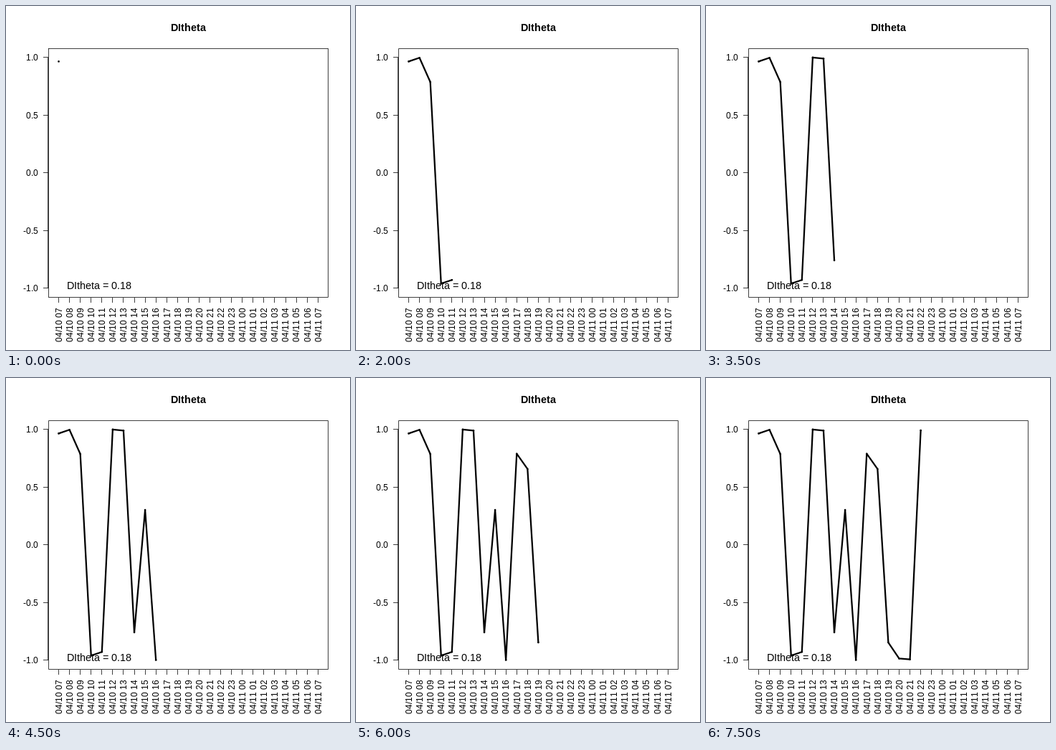
These frames come from a looping animation (480x480 px, 8000 ms). An HTML page with a canvas:

```html
<!DOCTYPE html>
<html lang="en">
<head>
<meta charset="utf-8">
<title>DItheta</title>
<style>
  html, body { margin: 0; width: 100%; height: 100%; overflow: hidden; background: #fff; }
  canvas { display: block; width: 480px; height: 480px; }
</style>
</head>
<body>
<canvas id="plot" width="480" height="480"></canvas>
<script>
const ctx = document.getElementById('plot').getContext('2d');
const FONT = '"Liberation Sans", Arial, sans-serif';
const STEP = 500, LOOP = 8000;
const HOURS = 25, FIRST_HOUR = 7, FIRST_DAY = 10;
const LEFT = 59.5, TOP = 59.5, RIGHT = 449.5, BOTTOM = 406.5;
const TICK = 7, LABEL_GAP = 14.5, HALF_DIGIT = 4.3;
const values = [0.966, 0.998, 0.788, -0.961, -0.929, 1, 0.991, -0.759,
                0.303, -0.999, 0.79, 0.658, -0.847, -0.986, -0.994, 0.993];

const xAt = i => 73.51 + i * 15.074;
const yAt = v => 232.8 - v * 160.89;
const pad = n => String(n).padStart(2, '0');
const snap = n => Math.floor(n) + 0.5;

function line(x1, y1, x2, y2) {
  ctx.beginPath();
  ctx.moveTo(x1, y1);
  ctx.lineTo(x2, y2);
  ctx.stroke();
}

// Sets glyphs on whole pixels; align is 0 for left, 0.5 for centre, 1 for right.
function text(str, x, y, size, align, weight = 'normal') {
  ctx.font = `${weight} ${size}px ${FONT}`;
  const widths = [...str].map(c => Math.round(ctx.measureText(c).width));
  const total = widths.reduce((a, b) => a + b, 0);
  let pen = Math.round(x - total * align);
  [...str].forEach((c, i) => {
    ctx.fillText(c, pen, Math.round(y));
    pen += widths[i];
  });
}

function drawAxes() {
  ctx.lineWidth = 0.75;
  ctx.lineCap = 'butt';
  ctx.strokeRect(LEFT, TOP, RIGHT - LEFT, BOTTOM - TOP);

  line(LEFT - 1, yAt(1), LEFT - 1, yAt(-1));
  for (let v = -1; v <= 1; v += 0.5) {
    const y = snap(yAt(v));
    line(LEFT - 0.5, y, LEFT - 0.5 - TICK, y);
    text(v.toFixed(1), LEFT - LABEL_GAP, yAt(v) + HALF_DIGIT, 12, 1);
  }

  for (let i = 0; i < HOURS; i++) {
    const hour = FIRST_HOUR + i;
    const day = FIRST_DAY + Math.floor(hour / 24);
    const x = snap(xAt(i));
    line(x, BOTTOM + 0.5, x, BOTTOM + 0.5 + TICK);
    ctx.save();
    ctx.translate(Math.round(xAt(i) + HALF_DIGIT), BOTTOM + LABEL_GAP);
    ctx.rotate(-Math.PI / 2);
    text(`04/${day} ${pad(hour % 24)}`, 0, 0, 12, 1);
    ctx.restore();
  }
}

function drawSeries(count) {
  ctx.lineWidth = 2.25;
  ctx.lineCap = ctx.lineJoin = 'round';
  ctx.beginPath();
  for (let i = 0; i < count; i++) ctx.lineTo(xAt(i), yAt(values[i]));
  if (count > 1) ctx.stroke();
  for (let i = 0; i < count; i++) {
    ctx.beginPath();
    ctx.arc(xAt(i), yAt(values[i]), 1.3, 0, 2 * Math.PI);
    ctx.fill();
  }
}

function draw(count) {
  ctx.fillStyle = '#fff';
  ctx.fillRect(0, 0, 480, 480);
  ctx.fillStyle = ctx.strokeStyle = '#000';
  drawAxes();
  text('DItheta', (LEFT + RIGHT) / 2, 35, 14.4, 0.5, 'bold');
  text('DItheta = 0.18', 85, 395, 14.4, 0);
  drawSeries(count);
}

const start = performance.now();
let shown = 0;

function tick(now) {
  const t = Math.max(0, now - start) % LOOP;
  const count = Math.floor(t / STEP) + 1;
  if (count !== shown) draw(shown = count);
  requestAnimationFrame(tick);
}

tick(start);
</script>
</body>
</html>
```
